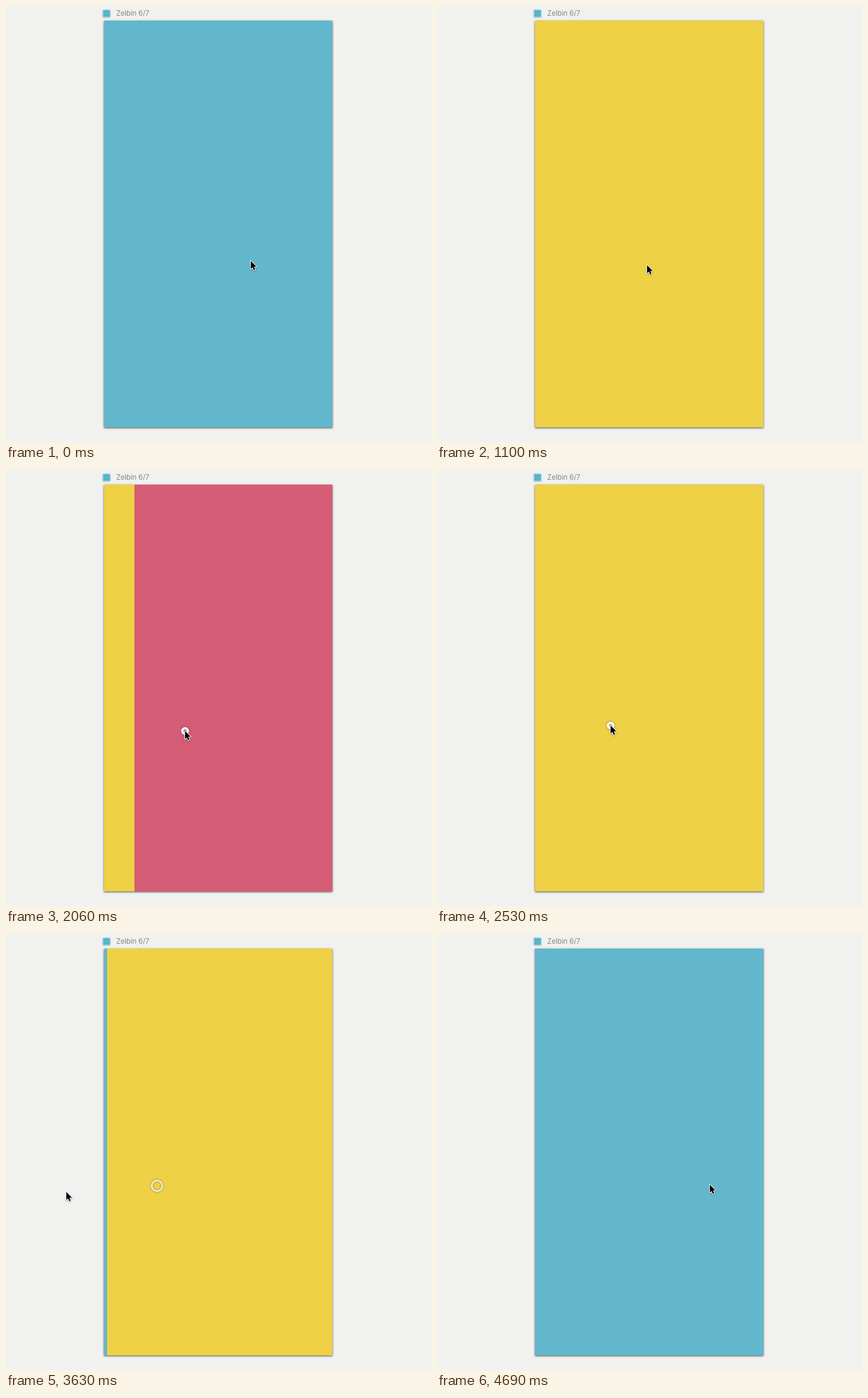
Recreate the animation shown at these times as an HTML page with a canvas. Size 698x715 px, loop 5.73 s.

```html
<!DOCTYPE html>
<html lang="en">
<head>
<meta charset="utf-8">
<title>Swipe pages</title>
<style>
html, body { margin: 0; width: 100%; height: 100%; overflow: hidden; background: #f1f1ef; }
canvas { display: block; }
</style>
</head>
<body>
<canvas id="stage" width="698" height="715"></canvas>
<script>
const ctx = document.getElementById('stage').getContext('2d');
const LOOP = 5730, LAST_MOVE = 4690;
const COAST = 130, FADE = 300;
const board = { x: 161, y: 24, w: 375, h: 667 };
const pages = ['#62b7cd', '#eed145', '#d65c76'];

const point = (x, y) => ({ x, y });

// A swipe drags from start to end, lets go, and the pointer coasts on to rest
const swipe = (press, release, start, end, rest, page) =>
  ({ press, release, start, end, rest, page });

const swipes = [
  swipe(40, 470, point(402, 418), point(251, 422), point(187, 430), 1),
  swipe(1110, 1332, point(345, 425), point(289, 422), point(244, 427), 2),
  swipe(1900, 2160, point(244, 428), point(333, 428), point(382, 425), 1),
  swipe(2530, 2795, point(285, 419), point(394, 419), point(447, 412), 0),
  swipe(3230, 3510, point(447, 412), point(248, 413), point(99, 423), 1),
  swipe(4000, 4405, point(172, 420), point(374, 417), point(448, 411), 0)
];

const progress = (t, from, to) => Math.min(1, Math.max(0, (t - from) / (to - from)));
const easeIn = u => u ** 1.2;
const easeOut = u => 1 - (1 - u) ** 3;
const easeInOut = u => u * u * (3 - 2 * u);
const mix = (a, b, u) => point(a.x + (b.x - a.x) * u, a.y + (b.y - a.y) * u);

const swipeIndex = t => swipes.findLastIndex(s => t >= s.press);

function pointer(t) {
  const i = swipeIndex(t);
  if (i < 0) return swipes[0].start;
  const s = swipes[i], next = swipes[i + 1];
  if (t < s.release) return mix(s.start, s.end, easeIn(progress(t, s.press, s.release)));
  const coasted = mix(s.end, s.rest, easeOut(progress(t, s.release, s.release + COAST)));
  if (!next) return coasted;
  return mix(coasted, next.start, easeInOut(progress(t, s.release + 150, next.press - 70)));
}

function scrollAt(t) {
  const i = swipeIndex(t);
  if (i < 0) return 0;
  const s = swipes[i];
  const origin = i ? swipes[i - 1].page * board.w : 0;
  if (t < s.release) return origin + s.start.x - pointer(t).x;

  // Critically damped spring, stiffer after a faster drag
  const travel = s.start.x - s.end.x;
  const target = s.page * board.w;
  const rate = 4.3 + 57 * Math.abs(travel) / (s.release - s.press);
  const k = rate * (t - s.release) / 1000;
  return target + (origin + travel - target) * (1 + k) * Math.exp(-k);
}

function roundedSquare(x, y, size, radius, color) {
  ctx.beginPath();
  ctx.roundRect(x, y, size, size, radius);
  ctx.fillStyle = color;
  ctx.fill();
}

function drawLabel() {
  roundedSquare(158, 5.5, 14, 3, '#a3d3de');
  roundedSquare(160, 7, 10.5, 1.5, '#59b3ca');
  ctx.fillStyle = '#858585';
  ctx.font = '11.5px Inter, sans-serif';
  ctx.fillText('Zelbin 6/7', 181, 16);
}

function shadow(alpha, blur, offsetY) {
  ctx.shadowColor = `rgba(0,0,0,${alpha})`;
  ctx.shadowBlur = blur;
  ctx.shadowOffsetY = offsetY;
}

function drawPages(scroll) {
  const { x, y, w, h } = board;
  ctx.save();
  shadow(0.7, 3, 1);
  ctx.fillStyle = pages[0];
  ctx.fillRect(x, y, w, h);
  ctx.restore();

  ctx.save();
  ctx.beginPath();
  ctx.rect(x, y, w, h);
  ctx.clip();
  pages.forEach((color, i) => {
    ctx.fillStyle = color;
    ctx.fillRect(x + Math.round(i * w - scroll), y, w, h);
  });
  ctx.restore();
}

function drawTouch(t) {
  const s = swipes[swipeIndex(t)];
  if (!s) return;
  const p = progress(t, s.release, s.release + FADE);
  const { x, y } = pointer(Math.min(t, s.release - 1e-6));
  const line = 4 - 2.5 * p;
  ctx.save();
  ctx.globalAlpha = Math.min(1, 1.35 * (1 - p));
  shadow(0.55, 3, 0);
  ctx.beginPath();
  ctx.arc(x, y, 6.5 + 9 * p - line / 2, 0, 2 * Math.PI);
  ctx.strokeStyle = '#fff';
  ctx.lineWidth = line;
  ctx.stroke();
  ctx.restore();
}

const arrow = new Path2D('M0 0V13.2L3 10.4L5 15.2L7.2 14.3L5.2 9.6H9.4Z');

function drawPointer({ x, y }) {
  ctx.save();
  ctx.translate(x, y);
  ctx.lineJoin = 'round';
  ctx.lineWidth = 2;
  ctx.strokeStyle = '#fff';
  shadow(0.35, 2, 1);
  ctx.stroke(arrow);
  shadow(0, 0, 0);
  ctx.fillStyle = '#000';
  ctx.fill(arrow);
  ctx.restore();
}

const began = performance.now();

function render() {
  const t = Math.min(Math.max(0, performance.now() - began) % LOOP, LAST_MOVE);
  ctx.fillStyle = '#f1f1ef';
  ctx.fillRect(0, 0, 698, 715);
  drawLabel();
  drawPages(scrollAt(t));
  drawTouch(t);
  drawPointer(pointer(t));
  requestAnimationFrame(render);
}
render();
</script>
</body>
</html>
```
